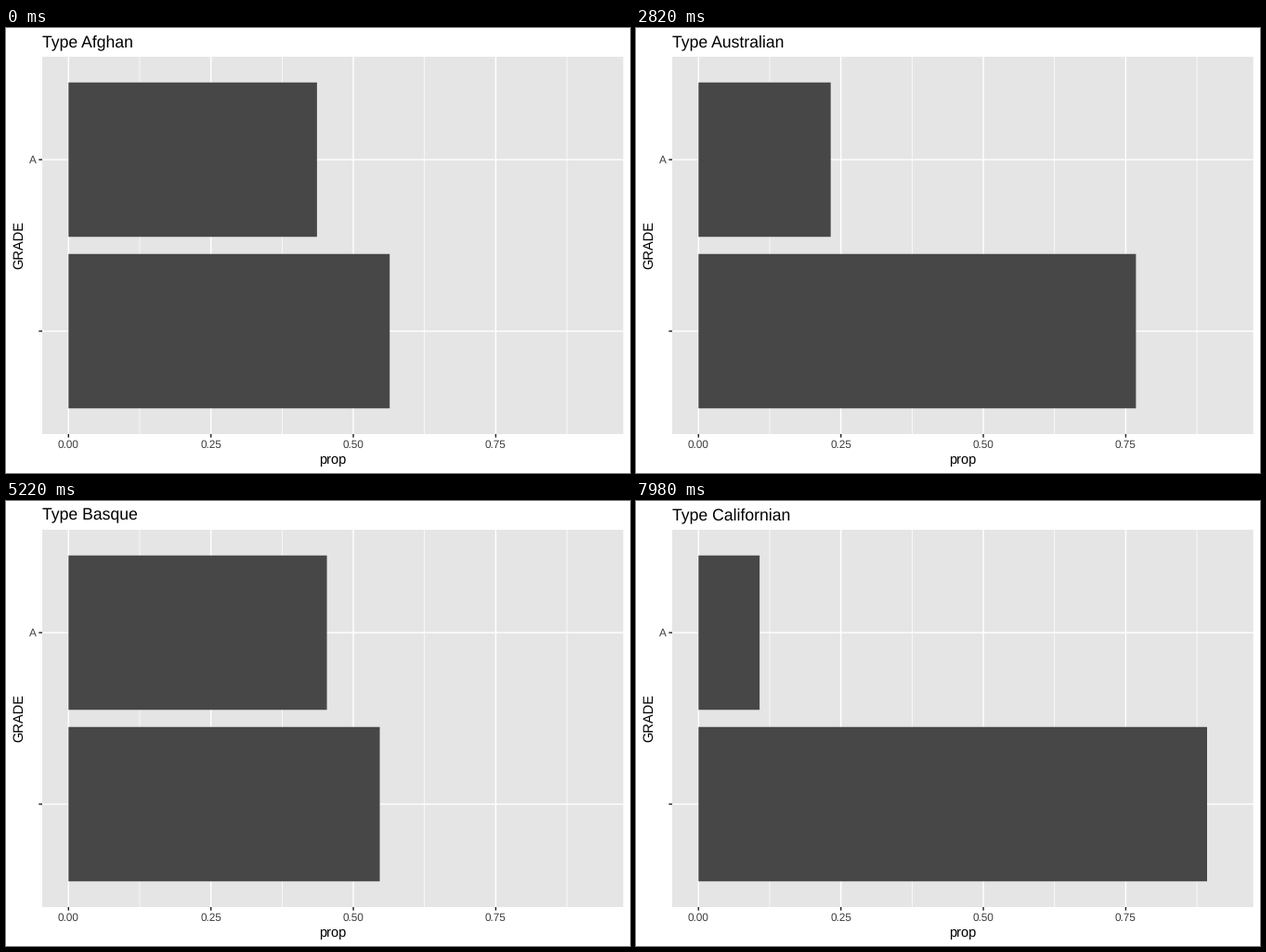
Animation, 672 px wide and 480 px high, one loop 8 s. Source, as a matplotlib script:

```python
import matplotlib.pyplot as plt
from matplotlib.animation import FuncAnimation
from matplotlib.patches import Rectangle

plt.rcParams.update({
    "toolbar": "None",
    "font.family": "Liberation Sans",
    "text.hinting": "none",
})

WIDTH, HEIGHT, DPI = 672, 480, 96
LOOP_MS, INTERVAL_MS, STEP_MS = 8000, 20, 30

# Steps per state: a tween followed by a short hold.
TWEEN, CYCLE = 16, 18

LEFT, RIGHT, TOP, BOTTOM = 39, 664.67, 31, 438
ZERO_X, UNIT = 67.3, 613.5
ROW_A, ROW_BLANK, BAR_H = 142, 327, 166.5
TICK = 3.67

PANEL, BAR, TICK_COLOR, LABEL = "#e5e5e5", "#474747", "#222222", "#3c3c3c"

# Share of ungraded entries per type; grade A takes the rest.
STATES = [
    ("Afghan", 0.5638),
    ("African", 0.8422),
    ("American", 0.6287),
    ("Armenian", 0.5601),
    ("Asian", 0.7444),
    ("Australian", 0.7721),
    ("Bagels/Pretzels", 0.6124),
    ("Bakery", 0.6531),
    ("Bangladeshi", 0.8976),
    ("Barbecue", 0.6694),
    ("Basque", 0.5293),
    ("Bottled beverages, including water, sodas, juices, etc.", 0.5989),
    ("Brazilian", 0.6825),
    ("Café/Coffee/Tea", 0.5358),
    ("Cajun", 0.6287),
    ("Californian", 0.8999),
]

fig = plt.figure(figsize=(WIDTH / DPI, HEIGHT / DPI), dpi=DPI, facecolor="white")
ax = fig.add_axes([0, 0, 1, 1])
ax.set_xlim(0, WIDTH)
ax.set_ylim(HEIGHT, 0)
ax.axis("off")


def to_x(prop):
    return ZERO_X + UNIT * prop


def line(xs, ys, color, width, z):
    ax.plot(xs, ys, color=color, lw=width, zorder=z,
            solid_capstyle="butt", snap=False)


def rect(x, y, w, h, color, z):
    patch = Rectangle((x, y), w, h, facecolor=color, lw=0, zorder=z, snap=False)
    return ax.add_patch(patch)


def label(x, y, text, size, color="black", ha="center", **kwargs):
    return ax.text(x, y, text, fontsize=size, color=color, ha=ha,
                   va="baseline", **kwargs)


def draw_panel():
    rect(LEFT, TOP, RIGHT - LEFT, BOTTOM - TOP, PANEL, 0)
    for i in range(4):
        minor, major = to_x(0.125 + 0.25 * i), to_x(0.25 * i)
        line([minor] * 2, [TOP, BOTTOM], "white", 0.53, 1)
        line([major] * 2, [TOP, BOTTOM], "white", 1.07, 2)
        line([major] * 2, [BOTTOM, BOTTOM + TICK], TICK_COLOR, 1.07, 2)
        label(major, 453, f"{0.25 * i:.2f}", 8.8, LABEL)
    for y in (ROW_A, ROW_BLANK):
        line([LEFT, RIGHT], [y, y], "white", 1.07, 2)
        line([LEFT - TICK, LEFT], [y, y], TICK_COLOR, 1.07, 2)
    label(32.4, 146.3, "A", 8.8, LABEL, ha="right")
    label(351.8, 469.6, "prop", 11)
    ax.text(18, (TOP + BOTTOM) / 2, "GRADE", fontsize=11, rotation=90,
            rotation_mode="anchor", ha="center", va="baseline")


draw_panel()
bar_a = rect(ZERO_X, ROW_A - BAR_H / 2, 0, BAR_H, BAR, 3)
bar_blank = rect(ZERO_X, ROW_BLANK - BAR_H / 2, 0, BAR_H, BAR, 3)
title = label(LEFT, 20, "", 13.2, ha="left")


def cubic_in_out(p):
    return 4 * p ** 3 if p < 0.5 else 1 - 4 * (1 - p) ** 3


def update(frame):
    # The picture advances on a 30 ms grid, the timer on a 20 ms one.
    step = (frame * INTERVAL_MS + 10) // STEP_MS
    index, local = divmod(max(step - 1, 0), CYCLE)
    p = min(local / TWEEN, 1)
    (name, start), (next_name, end) = STATES[index:index + 2]
    share = start + (end - start) * cubic_in_out(p)
    bar_blank.set_width(UNIT * share)
    bar_a.set_width(UNIT * (1 - share))
    title.set_text("Type " + (next_name if p > 0.5 else name))
    return bar_a, bar_blank, title


anim = FuncAnimation(fig, update, frames=LOOP_MS // INTERVAL_MS,
                     interval=INTERVAL_MS, repeat=True, repeat_delay=0)
plt.show()
```
